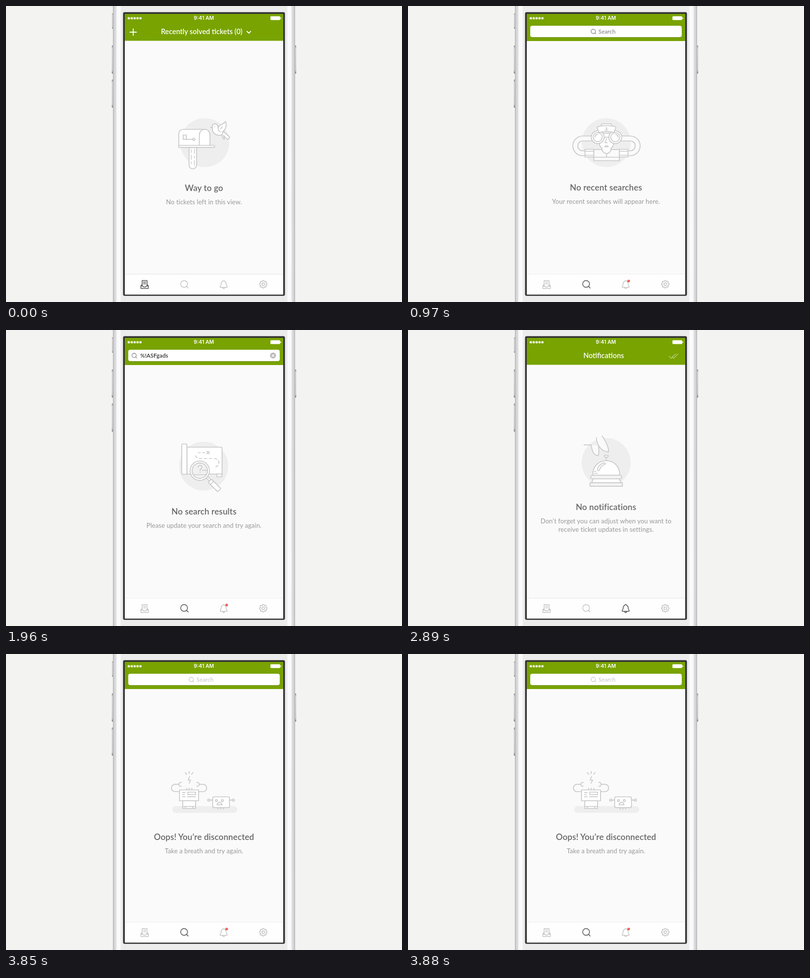
Write an HTML page that moves like this. It is 800 px wide and 600 px high and loops after 4850 ms.

```html
<!DOCTYPE html>
<html lang="en">
<head>
<meta charset="utf-8">
<title>Empty states</title>
<style>
  html, body { margin: 0; width: 100%; height: 100%; overflow: hidden; background: #f3f3f1; }
  svg { display: block; width: 100%; height: 100%; }
  text { font-family: Lato, "Open Sans", sans-serif; text-anchor: middle; }
  .time { font: 600 10.4px Inter, Roboto, sans-serif; fill: #fff; }
  .bar { font-size: 14.4px; font-weight: 600; fill: #fff; }
  .title { font-size: 17px; font-weight: 600; letter-spacing: .12px; fill: #666; }
  .note { font-size: 13px; letter-spacing: .1px; fill: #999; }
  .field { font-size: 11.6px; font-weight: 500; }
  .line { fill: none; stroke-linecap: round; stroke-linejoin: round; }
  .art { stroke: #c8c8c8; stroke-width: 1.7; }
  .white { fill: #fff; }
  .pale { fill: #fafafa; }
  .disc { fill: #eee; stroke: none; }
  .tab { stroke: #bcbcbc; stroke-width: 1.25; }
  .tab.on { stroke: #555; stroke-width: 1.5; }
</style>
</head>
<body>
<svg viewBox="0 0 800 600">
  <defs>
    <linearGradient id="body">
      <stop offset="0" stop-color="#a8a8aa"/>
      <stop offset=".005" stop-color="#d0d0d2"/>
      <stop offset=".017" stop-color="#dedee2"/>
      <stop offset=".021" stop-color="#f8f8f9"/>
      <stop offset=".040" stop-color="#fbfbfb"/>
      <stop offset=".044" stop-color="#ececec"/>
      <stop offset=".956" stop-color="#ececec"/>
      <stop offset=".960" stop-color="#fbfbfb"/>
      <stop offset=".979" stop-color="#f8f8f9"/>
      <stop offset=".983" stop-color="#dedee2"/>
      <stop offset=".995" stop-color="#d0d0d2"/>
      <stop offset="1" stop-color="#a8a8aa"/>
    </linearGradient>
    <linearGradient id="key" x2="0" y2="1">
      <stop offset="0" stop-color="#858587"/>
      <stop offset=".1" stop-color="#d2d2d4"/>
      <stop offset=".88" stop-color="#c9c9cb"/>
      <stop offset="1" stop-color="#77777a"/>
    </linearGradient>
    <g id="lens" class="line">
      <circle r="6.9"/>
      <path d="M5 5L8.3 8.3"/>
    </g>
    <g id="arm">
      <path class="pale" d="M376 263.5H353a20 20 0 0 0 0 40H358V293.5H353a10 10 0 0 1 0-20H373"/>
      <path class="white" d="M357.5 290.5H375.5V306H357.5ZM357.5 294.5H375.5M357.5 302.5H375.5"/>
    </g>
    <g id="eyepiece">
      <circle class="white" cx="383.3" cy="266" r="13"/>
      <circle cx="383.3" cy="266" r="9.2"/>
      <path d="M377.5 266a6 6 0 0 1 5-5.7"/>
    </g>
    <path id="claw" d="M350 279H341.5a7.4 7.4 0 0 1 0-14.8H349.5M354 260.3a4 4 0 1 0 0 7.8"/>
  </defs>

  <rect width="800" height="600" fill="#f3f3f1"/>
  <g fill="url(#key)">
    <rect x="214" y="15" width="4" height="31" rx="1.5"/>
    <rect x="213.7" y="80" width="4" height="57" rx="1.5"/>
    <rect x="213.7" y="149" width="4" height="57" rx="1.5"/>
    <rect x="582.3" y="80" width="4" height="57" rx="1.5"/>
  </g>
  <rect x="216" y="-2" width="368" height="604" fill="url(#body)"/>
  <rect x="236.5" y="12.5" width="327" height="575" rx="3" fill="#333"/>
  <rect x="240" y="16" width="320" height="569" fill="#fafafa"/>
  <rect id="head" x="240" y="16" width="320" height="54.5" fill="#78a300"/>

  <g id="dots" fill="#fff"></g>
  <text class="time" x="399.7" y="28.3">9:41 AM</text>
  <rect x="534.2" y="20.8" width="19.6" height="7.8" rx="1.5" fill="#fff"/>
  <path d="M554.4 23a1.7 1.7 0 0 1 0 3.5Z" fill="#fff"/>

  <g id="field">
    <rect x="247" y="41" width="306" height="23.3" rx="4" fill="#5f8200"/>
    <rect x="247" y="40" width="306" height="23.3" rx="4" fill="#fff"/>
    <g id="hint">
      <use href="#lens" transform="translate(374.3 51.4) scale(.63)" stroke-width="2"/>
      <text class="field" x="402" y="56">Search</text>
    </g>
    <g id="query">
      <use href="#lens" transform="translate(258.8 51.6) scale(.63)" stroke="#888" stroke-width="2"/>
      <text class="field" x="299.4" y="56" fill="#222">%!ASFgads</text>
      <circle cx="539.5" cy="51.8" r="6" fill="#b9b9b9"/>
      <path class="line" d="M537.3 49.6l4.4 4.4m0-4.4l-4.4 4.4" stroke="#fff" stroke-width="1.3"/>
    </g>
  </g>

  <g class="screen">
    <path class="line" d="M250.5 53H263.5M257 46.5V59.5M486.8 51.3L490.5 55L494.2 51.3" stroke="#fff" stroke-width="1.8"/>
    <text class="bar" x="395.3" y="57">Recently solved tickets (0)</text>
    <g class="line art">
      <circle class="disc" cx="401.5" cy="277" r="49.5"/>
      <path class="white" d="M369.8 287V322.5a7.6 7.6 0 0 0 15.2 0V287Z"/>
      <path d="M374.3 291V297M374.3 302V311M374.3 316V320M380.5 290V299M380.5 304V308M380.5 313V323" stroke-width="1.4"/>
      <path class="white" d="M349 283V260Q349 250 359 250H402Q412 251 412 262V283Z"/>
      <path d="M390.5 283V262Q391 251 401.5 250"/>
      <rect class="white" x="348.5" y="282.5" width="73" height="4.2" rx="1.8"/>
      <path d="M358 270.3V261.5H364V270.3M358 270.3H377"/>
      <circle cx="379.5" cy="270.3" r="2.3"/>
      <path class="white" d="M434 257L438 267Q440 272 441.5 269L439 262L446 269.5Q449 272 449 268Q453 268 451.5 265L440 255Z"/>
      <path class="white" d="M413 246.5L416.8 245.5C416.5 238 424 237 427.5 242L428.5 246C432 239 440 240 443.5 234C446.5 243 444 250 437.5 255Q439 259 434.5 261.5C424 264 416 257 417 247Z"/>
      <path d="M428.5 246Q428 253 433 255M437 245l-3 4M421.6 244.5v.2"/>
    </g>
    <text class="title" x="400" y="374.7">Way to go</text>
    <text class="note" x="400" y="402">No tickets left in this view.</text>
  </g>

  <g class="screen">
    <g class="line art">
      <circle class="disc" cx="400.5" cy="277" r="49.5"/>
      <use href="#arm"/>
      <use href="#arm" transform="matrix(-1 0 0 1 802 0)"/>
      <path class="pale" d="M375.5 291H427V313.5H375.5ZM375.5 306.5H427M401.2 299V306.5"/>
      <path class="white" d="M386 258V276Q387 285 392 288.5V292.5Q396 299 401 299Q406 299 410 292.5V288.5Q415 285 416 276V258Z"/>
      <use href="#eyepiece"/>
      <use href="#eyepiece" transform="matrix(-1 0 0 1 802 0)"/>
      <path d="M396.5 266H405.5M401.5 268.5L397.8 277H403M397 285.5Q401 280.5 405 285.5Z" stroke-width="1.5"/>
      <path class="white" d="M389.8 243.5Q390 239 394 239H408Q412 239 412.2 243.5Z"/>
      <path class="white" d="M386 256.5L382.2 247Q382 244 385 244Q401 241.5 417 244Q420 244 419.8 247L416 256.5Q401 252 386 256.5Z"/>
      <path d="M401 246V252M399.3 247.5H402.7M398 250Q401 255 404 250" stroke-width="1.2"/>
    </g>
    <text class="title" x="400" y="373.7">No recent searches</text>
    <text class="note" x="400" y="401.2">Your recent searches will appear here.</text>
  </g>

  <g class="screen">
    <g class="line art">
      <circle class="disc" cx="399.5" cy="276" r="49.5"/>
      <path class="white" d="M365.5 237.5H434.5Q436.5 237.5 436.5 240V292H365.5Z"/>
      <path class="white" d="M436.5 292V295.5Q436.5 297.5 434 297.5H427.5Q425 297.5 425.5 292Z"/>
      <rect class="white" x="355" y="231" width="10.5" height="61.5" rx="2.5"/>
      <path d="M388.5 248.5H392.5M397 248.5H401.5M405.5 245.8l5.4 5.4m0-5.4l-5.4 5.4"/>
      <path d="M383 255Q385 261 392 260.5H422Q430 262 430 269Q430 276 421 278.5" stroke-dasharray="5 5"/>
      <path class="white" d="M404.5 300L407.5 297L414 303.5L411 306.5Z"/>
      <rect class="white" x="-1" y="-4.6" width="27" height="9.2" rx="2.2" transform="translate(412.5 306.3) rotate(45)"/>
      <path d="M413.5 313L419.5 307"/>
      <circle class="white" cx="391.5" cy="285.2" r="19.6"/>
      <circle cx="391.5" cy="285.2" r="15.6" fill="#f1f1f1"/>
      <path d="M388 278.3Q388.2 274.5 392 274.5Q396 274.5 396 278.3Q396 280 393.8 281.5Q392 282.7 392 285M392 288.2v.2"/>
      <path d="M396.5 284.5H406.5M378 293.3H405" stroke-width="1.3"/>
    </g>
    <text class="title" x="400" y="373.7">No search results</text>
    <text class="note" x="400" y="401.2">Please update your search and try again.</text>
  </g>

  <g class="screen">
    <text class="bar" x="395.2" y="57">Notifications</text>
    <path class="line" d="M527.5 53.5L531.5 57.5L540.5 48.5M533.5 54L536.5 57.5L545.5 48.5" stroke="#b7cd78" stroke-width="1.4"/>
    <g class="line art">
      <circle class="disc" cx="400.3" cy="268.5" r="49.5"/>
      <path class="pale" d="M355.5 232.8H370C371.5 240 372 253.5 384 254.7C387 248 385.5 242 384.8 234.5"/>
      <path class="pale" d="M380.5 218.5C381.5 232 389 246 405 247.2C406.5 240 398.5 223 392 215"/>
      <path class="white" d="M400.5 258V265M396.3 254.5Q400.5 253 404.8 254.5Q404.5 258 400.5 258Q396.6 258 396.3 254.5Z"/>
      <path class="white" d="M373.3 294.5C373 276 385 265 400.5 265C416 265 428 276 427.7 294.5Z"/>
      <path d="M383 284C383 276 390 270 397.5 269.3Q400 270.5 397.5 272.5C391 274 388.5 278 387 283.5Q385 286.5 383 284ZM376.5 286.5H380M376.5 290.5H382.5"/>
      <path class="white" d="M374.5 301.5H426.5L430 309.5H371Z"/>
      <rect x="369" y="294.5" width="63" height="7" rx="3.5" fill="#f4f4f4"/>
      <rect x="367.8" y="309.7" width="65.4" height="7" fill="#f4f4f4"/>
    </g>
    <text class="title" x="400" y="365">No notifications</text>
    <text class="note" x="400" y="391.5">Don’t forget you can adjust when you want to</text>
    <text class="note" x="400" y="409">receive ticket updates in settings.</text>
  </g>

  <g class="screen">
    <g class="line art">
      <rect class="disc" x="336" y="308.5" width="131" height="13.5" rx="6.5"/>
      <use href="#claw"/>
      <use href="#claw" transform="matrix(-1 0 0 1 739.6 0)"/>
      <path d="M370 238V242.3M362.3 240.3L365 243.8M377.7 240.3L375 243.8M371 248.5L367.8 255.5H373L370 262M365 272V275M370 272V275M375.5 272V275"/>
      <path class="white" d="M350.5 275.5H389V297.5H350.5Z"/>
      <path d="M356.5 280.8H362M356.5 285H360.5M356.5 289.3H362M366.5 289.3H383"/>
      <rect x="367.3" y="280" width="15.7" height="5"/>
      <path class="white" d="M357 297.5H383V313H357ZM357 309H383M362 309V313M377.5 309V313"/>
      <rect class="white" x="417.5" y="289.5" width="34" height="21.8" rx="3"/>
      <path d="M412 296.2H417.5M451.5 296.2H457M428.5 312V314.5M434 312V314.5M439.5 312V314.5M426.2 305.6Q428 300.6 431.5 300.6Q435 300.6 436.5 305.6Z"/>
      <circle cx="409.6" cy="296.2" r="2.2"/>
      <circle cx="459.4" cy="296.2" r="2.2"/>
      <circle cx="425" cy="297" r="2"/>
      <circle cx="437" cy="297" r="2"/>
    </g>
    <text class="title" x="400" y="376.7">Oops! You’re disconnected</text>
    <text class="note" x="400" y="404.3">Take a breath and try again.</text>
  </g>

  <rect x="240" y="543" width="320" height="42" fill="#fefefe"/>
  <rect id="rule" x="240" y="543" width="320" height="1" fill="#e4e4e4"/>
  <g class="tab line">
    <path d="M275 564.5L272.5 567V572.5H287.5V567L285 564.5M272.5 567.5H276.5L277.5 569.5H282.5L283.5 567.5H287.5M275 567V556.5H285V567M277.5 559.8H282.5M277.5 563H282.5"/>
  </g>
  <g class="tab line"><use href="#lens" x="359.8" y="563.4"/></g>
  <g class="tab line">
    <path d="M437.7 558.2C438 556 441.5 556 441.8 558.2C444.5 559.3 445 561.8 445 565L447 569.3Q447 570.3 446 570.3H433.5Q432.5 570.3 432.5 569.3L434.5 565C434.5 561.8 435 559.3 437.7 558.2ZM437.5 570.5Q438 572.8 439.8 572.8Q441.6 572.8 442 570.5"/>
  </g>
  <g class="tab line"><path id="gear"/><circle cx="519.7" cy="564" r="2.6"/></g>
  <circle id="badge" cx="445.8" cy="557.4" r="2.7" fill="#f0625c"/>
</svg>
<script>
  const LOOP = 4850;
  const starts = [0, 970, 1930, 2890, 3850];
  const tabOf = [0, 1, 1, 2, 1];

  const el = id => document.getElementById(id);
  const screens = document.querySelectorAll('.screen');
  const tabs = document.querySelectorAll('.tab');
  const toggle = (node, on) => { node.style.display = on ? '' : 'none'; };

  function drawDots() {
    for (let i = 0; i < 5; i++) {
      const dot = document.createElementNS('http://www.w3.org/2000/svg', 'circle');
      dot.setAttribute('cx', 248 + i * 5.9);
      dot.setAttribute('cy', 24.9);
      dot.setAttribute('r', 2.4);
      el('dots').append(dot);
    }
  }

  // Eight teeth, four corners each.
  function drawGear() {
    const corners = [[-.3, 5.8], [-.17, 7.7], [.17, 7.7], [.3, 5.8]];
    const points = [];
    for (let i = 0; i < 8; i++) {
      for (const [turn, r] of corners) {
        const a = i * Math.PI / 4 + turn;
        points.push((519.7 + r * Math.sin(a)).toFixed(2) + ' ' + (564 - r * Math.cos(a)).toFixed(2));
      }
    }
    el('gear').setAttribute('d', 'M' + points.join('L') + 'Z');
  }

  function show(n) {
    const searching = tabOf[n] === 1;
    const grey = n === 4 ? '#c6c6c6' : '#808080';
    screens.forEach((s, i) => toggle(s, i === n));
    tabs.forEach((t, i) => t.classList.toggle('on', i === tabOf[n]));
    toggle(el('field'), searching);
    toggle(el('badge'), searching);
    toggle(el('hint'), n !== 2);
    toggle(el('query'), n === 2);
    el('hint').setAttribute('fill', grey);
    el('hint').setAttribute('stroke', 'none');
    el('hint').querySelector('use').setAttribute('stroke', grey);
    el('head').setAttribute('height', searching ? 55 : 54.5);
    el('rule').setAttribute('fill', searching ? '#eeeeee' : '#e4e4e4');
  }

  let current = -1;
  function tick(now) {
    const t = now % LOOP;
    const n = starts.filter(s => s <= t).length - 1;
    if (n !== current) show(current = n);
    requestAnimationFrame(tick);
  }

  drawDots();
  drawGear();
  show(current = 0);
  const begin = performance.now();
  requestAnimationFrame(function first(now) {
    const run = time => {
      const t = Math.max(0, time - begin) % LOOP;
      const n = starts.filter(s => s <= t).length - 1;
      if (n !== current) show(current = n);
      requestAnimationFrame(run);
    };
    run(now);
  });
</script>
</body>
</html>
```
